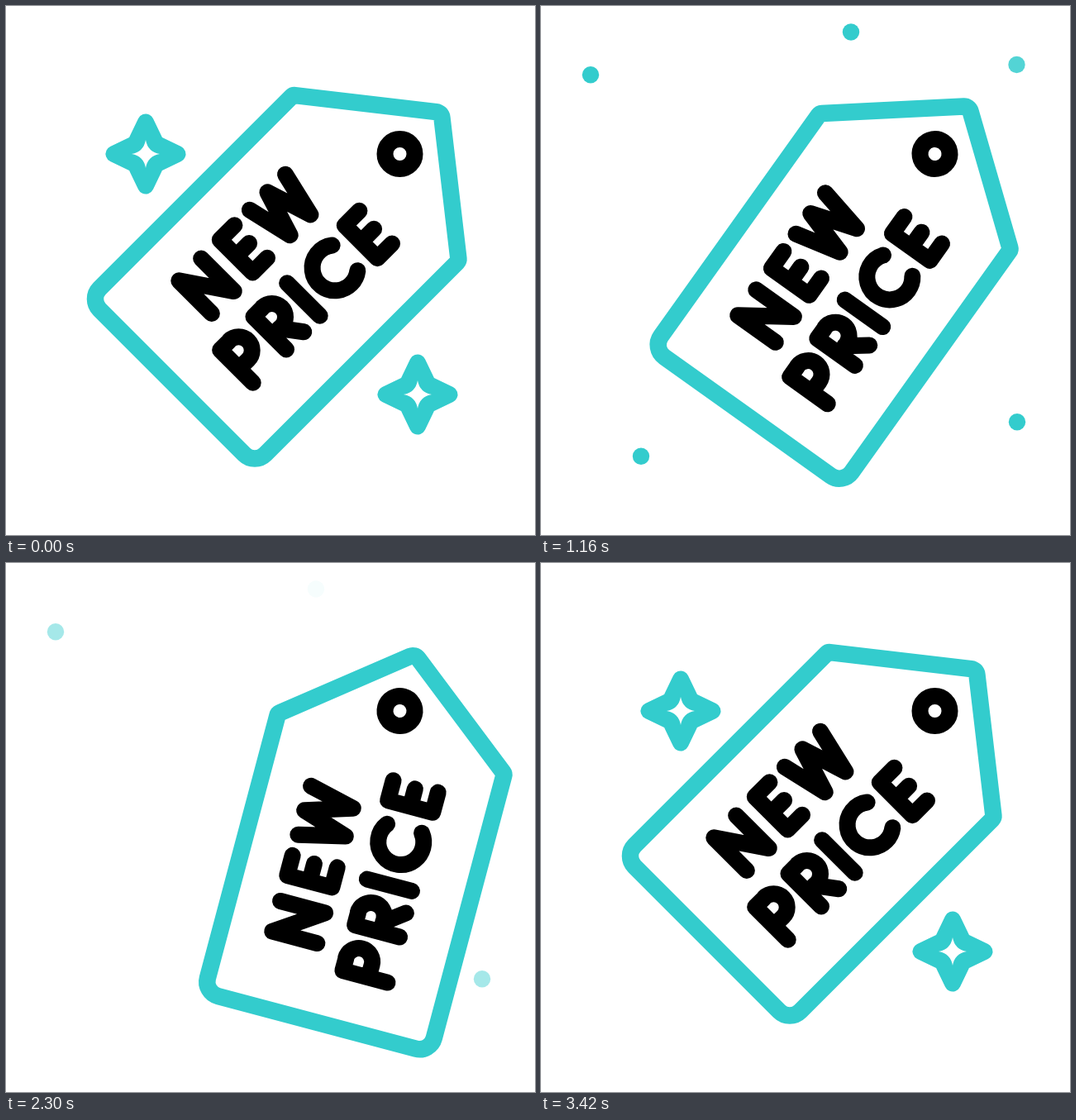
An HTML page with a canvas for the animation above (3600 ms loop, 640 by 640 pixels).

```html
<!DOCTYPE html>
<html lang="en">
<head>
<meta charset="utf-8">
<title>New price</title>
<style>
  html, body { margin: 0; width: 100%; height: 100%; overflow: hidden; background: #fff; }
  canvas { display: block; width: 640px; height: 640px; }
</style>
</head>
<body>
<canvas id="stage" width="640" height="640"></canvas>
<script>
const ctx = document.getElementById('stage').getContext('2d');
const LOOP = 3600;
const TEAL = '#33cccd';
const CAP = 56;
const BLINK = 670, FADE = 200, REPEAT = 890, LAST_BLINK = 2000;

const clamp = v => Math.min(1, Math.max(0, v));
const ease = (t, start, length) => (1 - Math.cos(Math.PI * clamp((t - start) / length))) / 2;

// Pull back, drop, slow drift, swing up, settle (degrees)
function tagAngle(t) {
  return 23.4 * ease(t, 470, 250)
    - 32.2 * ease(t, 720, 500)
    - 21.3 * ease(t, 900, 1400)
    + 46.8 * ease(t, 2300, 380)
    - 16.7 * ease(t, 2680, 500);
}

// Swell then vanish; the return is the same in reverse
function starSize(t) {
  const d = Math.min(t, 3620 - t);
  return 1 + 0.53 * ease(d, 200, 150) - 1.53 * ease(d, 350, 370);
}

function dotAlpha(t, first) {
  let alpha = 0;
  for (let s = first; s < LAST_BLINK; s += REPEAT) {
    alpha = Math.max(alpha, clamp(Math.min(t - s, s + BLINK - t) / FADE));
  }
  return alpha;
}

function line(...p) {
  ctx.moveTo(p[0], p[1]);
  for (let i = 2; i < p.length; i += 2) ctx.lineTo(p[i], p[i + 1]);
}

function bowl() {
  line(0, CAP, 0, 0, 15.5, 0);
  ctx.arc(15.5, 16, 16.3, -Math.PI / 2, Math.PI / 2);
  ctx.lineTo(0, 32);
}

// Each glyph draws from its top left and returns its advance
const glyphs = {
  N() { line(0, CAP, 0, 0, 38, CAP, 38, 0); return 70; },
  E() {
    line(25, 0, 0, 0, 0, CAP, 25, CAP);
    line(0, CAP / 2, 22, CAP / 2);
    return 51;
  },
  W() { line(0, 0, 13, CAP, 30.5, 0, 48, CAP, 61, 0); return 87; },
  P() { bowl(); return 57; },
  R() { bowl(); line(12, 32, 30, CAP); return 57.5; },
  I() { line(0, 0, 0, CAP); return 26.5; },
  C() {
    ctx.moveTo(44.4, 6.3);
    ctx.arc(27.5, CAP / 2, 27.5, -0.91, 0.91, true);
    return 72;
  }
};

function drawWord(word, x, y) {
  ctx.save();
  ctx.translate(x, y);
  ctx.beginPath();
  for (const letter of word) ctx.translate(glyphs[letter](), 0);
  ctx.stroke();
  ctx.restore();
}

// Tag space: origin at the hole, point of the tag along +x
function drawTag(angle) {
  const back = -390, shoulder = -41, tip = 71, half = 141.7;
  ctx.save();
  ctx.translate(476.5, 179);
  ctx.rotate((angle - 45) * Math.PI / 180);
  ctx.lineCap = ctx.lineJoin = 'round';

  ctx.beginPath();
  ctx.moveTo(back, 0);
  ctx.arcTo(back, -half, shoulder, -half, 18);
  ctx.arcTo(shoulder, -half, tip, 0, 5);
  ctx.arcTo(tip, 0, shoulder, half, 8);
  ctx.arcTo(shoulder, half, back, half, 5);
  ctx.arcTo(back, half, back, 0, 18);
  ctx.closePath();
  ctx.fillStyle = '#fff';
  ctx.fill();
  ctx.lineWidth = 20.5;
  ctx.strokeStyle = TEAL;
  ctx.stroke();

  ctx.lineWidth = 20;
  ctx.strokeStyle = '#000';
  ctx.beginPath();
  ctx.arc(0, 0, 18, 0, 7);
  ctx.stroke();
  drawWord('NEW', -297.4, -80.5);
  drawWord('PRICE', -321.4, 14);
  ctx.restore();
}

function drawStar(x, y, size) {
  if (size < 0.01) return;
  const tip = 38.5, notch = 12.5, hole = 17, bend = 2.5;
  ctx.save();
  ctx.translate(x, y);
  ctx.scale(size, size);
  ctx.fillStyle = ctx.strokeStyle = TEAL;
  ctx.lineWidth = 20;
  ctx.lineJoin = 'round';
  ctx.beginPath();
  for (let i = 0; i < 4; i++) {
    ctx.lineTo(0, -tip);
    ctx.lineTo(notch, -notch);
    ctx.rotate(Math.PI / 2);
  }
  ctx.closePath();
  ctx.fill();
  ctx.stroke();

  ctx.fillStyle = '#fff';
  ctx.beginPath();
  ctx.moveTo(0, -hole);
  for (let i = 0; i < 4; i++) {
    ctx.quadraticCurveTo(bend, -bend, hole, 0);
    ctx.rotate(Math.PI / 2);
  }
  ctx.fill();
  ctx.restore();
}

function drawDot(t, x, y, first) {
  ctx.globalAlpha = dotAlpha(t, first);
  ctx.fillStyle = TEAL;
  ctx.beginPath();
  ctx.arc(x, y, 10.2, 0, 7);
  ctx.fill();
  ctx.globalAlpha = 1;
}

function draw(t) {
  ctx.fillStyle = '#fff';
  ctx.fillRect(0, 0, 640, 640);

  drawDot(t, 60, 83.3, 830);
  drawDot(t, 576, 503.3, 830);
  drawDot(t, 375, 31.5, 750);
  drawDot(t, 575.5, 71, 660);
  drawDot(t, 121, 544.7, 730);
  drawDot(t, 150, 228.4, 1294);

  const size = starSize(t);
  drawStar(169, 179, size);
  drawStar(498, 470, size);
  drawTag(tagAngle(t));
}

const start = performance.now();
function frame(now) {
  draw(Math.max(0, now - start) % LOOP);
  requestAnimationFrame(frame);
}
draw(0);
requestAnimationFrame(frame);
</script>
</body>
</html>
```
